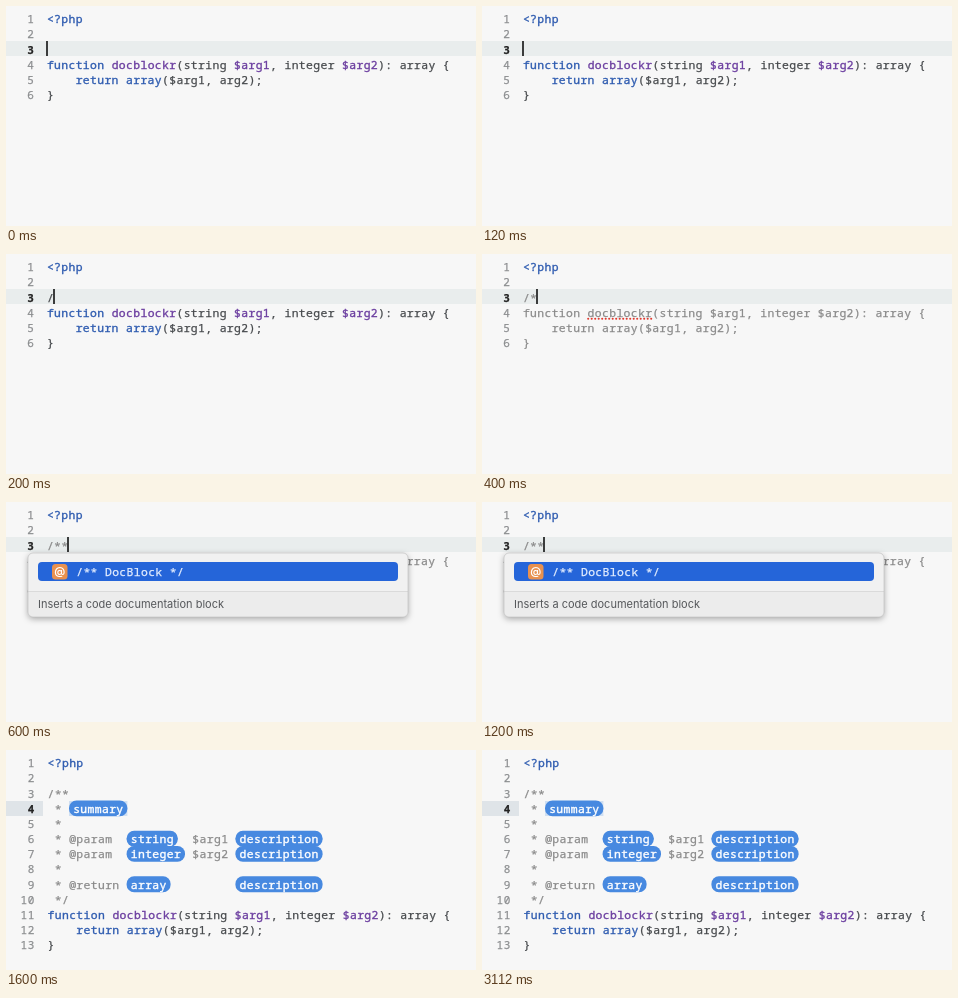
Animation of 470 by 220 pixels, one loop 4.12 s. Source, as an HTML page:

```html
<!DOCTYPE html>
<html lang="en">
<head>
<meta charset="utf-8">
<title>Doc block completion</title>
<style>
html, body { margin: 0; width: 100%; height: 100%; overflow: hidden; background: #f7f7f7; }
svg { display: block; width: 470px; height: 220px; }
text {
  font: 500 11.4px "Noto Sans Mono", "Liberation Mono", monospace;
  letter-spacing: .36px;
  white-space: pre;
  color: #46494c;
  fill: currentColor;
  stroke: currentColor;
  stroke-width: .25px;
}
.key { color: #2f5cb0; stroke-width: .35px; }
.name { color: #6c3fa0; stroke-width: .35px; }
.dim { color: #8a8a8a; }
.num, .now { font-size: 11px; text-anchor: end; letter-spacing: .6px; color: #8c8e90; }
.now { color: #222; font-weight: 600; }
.field { color: #fff; stroke-width: .4px; }
.pick { color: #e6efff; }
.note, .icon { font: 400 11px Inter, "Open Sans", sans-serif; letter-spacing: 0; color: #55575a; stroke: none; }
.icon { font-weight: 600; color: #fff; text-anchor: middle; }
.panel { filter: drop-shadow(0 2px 3px rgba(0, 0, 0, .32)); }
</style>
</head>
<body>
<svg viewBox="0 0 470 220"></svg>
<script>
const LOOP = 4120;
const CHAR = 7.2, ROW = 15.17, TOP = 5.2, PAD = 4;
const svg = document.querySelector('svg');

function add(parent, tag, attrs = {}, text) {
  const el = document.createElementNS('http://www.w3.org/2000/svg', tag);
  for (const key in attrs) el.setAttribute(key, attrs[key]);
  if (text !== undefined) el.textContent = text;
  parent.append(el);
  return el;
}
const rect = (g, x, y, width, height, fill, rx = 0) =>
  add(g, 'rect', { x, y, width, height, fill, rx });
const label = (g, x, y, cls, text) => add(g, 'text', { x, y, class: cls }, text);
const rowTop = row => TOP + (row - 1) * ROW;
const baseline = row => rowTop(row) + 12;

// Tokens are [class, text]; "field" tokens sit in a padded pill.
function codeLine(g, left, row, tokens) {
  let x = left;
  for (const [cls, text] of tokens) {
    const pad = cls === 'field' ? PAD : 0;
    const width = text.length * CHAR + 2 * pad;
    if (pad) rect(g, x, rowTop(row) - .2, width, 15.8, '#4789e0', 7.5);
    label(g, x + pad + .18, baseline(row), cls, text);
    x += width;
  }
}

function numbers(g, right, count, current) {
  for (let n = 1; n <= count; n++)
    label(g, right, baseline(n), n === current ? 'now' : 'num', n);
}

const openTag = [['key', '<?php']];
const body = [
  [['key', 'function '], ['name', 'docblockr'], ['', '(string '], ['name', '$arg1'],
   ['', ', integer '], ['name', '$arg2'], ['', '): array {']],
  [['key', '    return array'], ['', '($arg1, arg2);']],
  [['', '}']]
];
const muted = line => [['dim', line.map(token => token[1]).join('')]];

function typing(g, typed) {
  const left = 40.7, open = typed.length > 1;
  rect(g, 0, 35, 470, 15, '#e9eded');
  numbers(g, 28.4, 6, 3);
  codeLine(g, left, 1, openTag);
  codeLine(g, left, 3, [[open ? 'dim' : '', typed]]);
  body.forEach((line, i) => codeLine(g, left, 4 + i, open ? muted(line) : line));
  if (open) add(g, 'line', {
    x1: 106.2, x2: 170, y1: 64.8, y2: 64.8, stroke: '#e0392f',
    'stroke-width': 2.1, 'stroke-linecap': 'round', 'stroke-dasharray': '0 3.5'
  });
  rect(g, Math.round(left + typed.length * CHAR) - .8, 35, 1.6, 15, '#111');
}

function popup(g) {
  rect(g, 22, 51, 380, 64, '#f1f1f1', 5).setAttribute('class', 'panel');
  add(g, 'path', { d: 'M22 89.5H402V110a5 5 0 0 1-5 5H27a5 5 0 0 1-5-5Z', fill: '#ececec' });
  rect(g, 22, 89, 380, 1, '#dadada');
  add(g, 'rect', {
    x: 22, y: 51, width: 380, height: 64, rx: 5,
    fill: 'none', stroke: '#bdbdbd', 'stroke-width': .6
  });
  rect(g, 32, 60, 360, 19, '#2565d9', 4);
  rect(g, 46, 62, 15.5, 15.5, '#e8914f', 3.5);
  label(g, 53.7, 73.3, 'icon', '@');
  label(g, 70.2, 74, 'pick', '/** DocBlock */');
  label(g, 32, 106, 'note', 'Inserts a code documentation block');
}

function inserted(g) {
  const left = 41.4;
  const dim = text => ['dim', text], field = text => ['field', text];
  rect(g, 0, 51, 37, 15, '#dfe4e8');
  rect(g, left + 3 * CHAR, 51, 7 * CHAR + 2 * PAD, 15, '#cfdff2');
  numbers(g, 28.9, 13, 4);
  [
    openTag,
    [],
    [dim('/**')],
    [dim(' * '), field('summary')],
    [dim(' *')],
    [dim(' * @param  '), field('string'), dim('  $arg1 '), field('description')],
    [dim(' * @param  '), field('integer'), dim(' $arg2 '), field('description')],
    [dim(' *')],
    [dim(' * @return '), field('array'), dim(' '.repeat(9)), field('description')],
    [dim(' */')],
    ...body
  ].forEach((line, i) => codeLine(g, left, i + 1, line));
}

const scenes = [
  [0, g => typing(g, '')],
  [200, g => typing(g, '/')],
  [400, g => typing(g, '/*')],
  [600, g => { typing(g, '/**'); popup(g); }],
  [1600, inserted]
];

rect(svg, 0, 0, 470, 220, '#f7f7f7');
const groups = scenes.map(([, draw]) => {
  const g = add(svg, 'g');
  draw(g);
  return g;
});

const origin = performance.now();
function tick() {
  const t = Math.max(0, performance.now() - origin) % LOOP;
  const current = scenes.findLastIndex(([start]) => t >= start);
  groups.forEach((g, i) => { g.style.display = i === current ? '' : 'none'; });
  requestAnimationFrame(tick);
}
tick();
</script>
</body>
</html>
```
